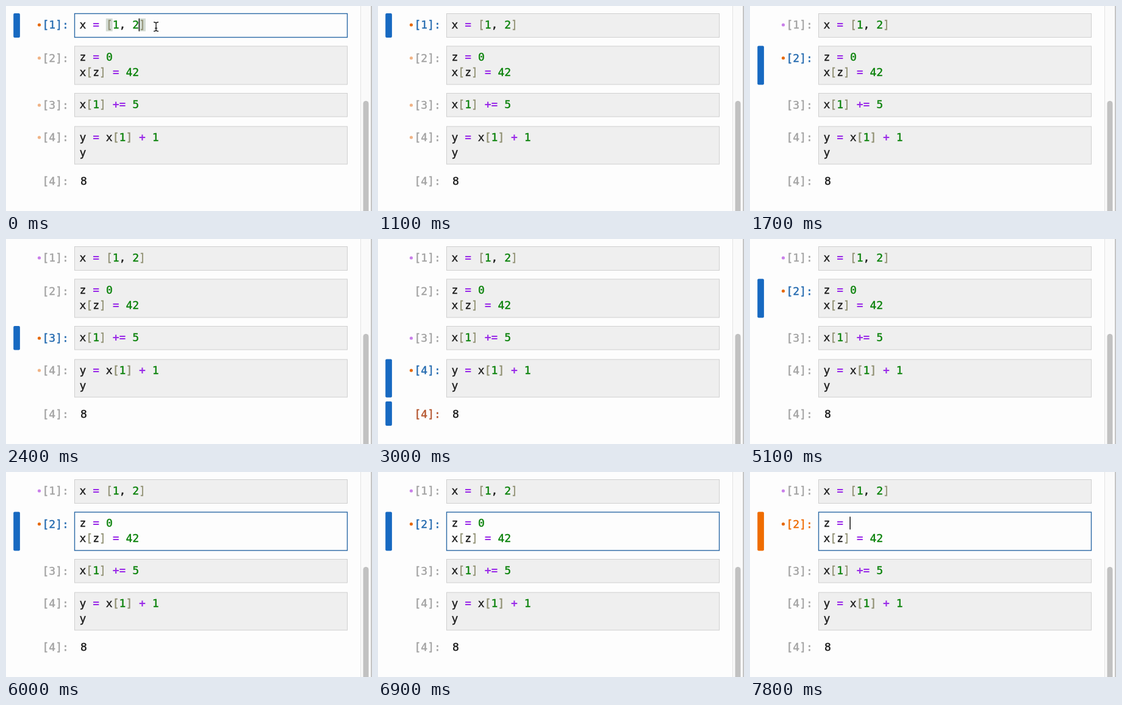
An HTML page for the animation above (8000 ms loop, 600 by 337 pixels).

```html
<!DOCTYPE html>
<html lang="en">
<head>
<meta charset="utf-8">
<title>Notebook cells</title>
<style>
  html, body { margin: 0; width: 100%; height: 100%; overflow: hidden; background: #fdfdfd; }
  svg { display: block; }
  text {
    font: 18px "DejaVu Sans Mono", "Liberation Mono", monospace; white-space: pre;
    color: #1c1c1c; fill: currentColor; stroke: currentColor; stroke-width: 0.4px;
  }
  tspan { fill: currentColor; stroke: currentColor; }
  .op { color: #9a2be8; font-weight: bold; stroke-width: 0; }
  .num { color: #0a820a; }
  .br { color: #8f8f72; }
</style>
</head>
<body>
<svg id="stage" width="600" height="337" viewBox="0 0 600 337"></svg>
<script>
const LOOP = 8000;
const CODE_X = 120.5;
const ADVANCE = 10.837;
const BLUE = '#1769c1';
const ORANGE = '#ef6c00';
const GRAY = '#a2a2a2';
const DOTS = { O: '#e66a08', o: '#f0b487', p: '#c980ea' };

// Dots of the four cells for each selected cell: O own, o downstream, p upstream
const LINKS = ['Oooo', 'pO--', 'p-Oo', 'p-pO'];

const CELLS = [
  { y: 12, h: 40, prompt: 37, dot: 31, lines: [['x = [1, 2]', 37]] },
  { y: 65.5, h: 64, prompt: 91.5, dot: 85.5, lines: [['z = 0', 90], ['x[z] = 42', 115]] },
  { y: 143, h: 39.5, prompt: 169, dot: 163, lines: [['x[1] += 5', 167.5]] },
  { y: 197.5, h: 63, prompt: 222, dot: 216, lines: [['y = x[1] + 1', 221.5], ['y', 246.5]] }
];

// Each step changes only the named parts of the state
const STEPS = [
  [0, { sel: 0, edit: true, caret: 9, match: true, mouse: true, dirty: false }],
  [500, { edit: false, caret: -1, match: false, mouse: false }],
  [1500, { sel: 1 }],
  [2400, { sel: 2 }],
  [3000, { sel: 3 }],
  [3600, { sel: 2 }],
  [4500, { sel: 1 }],
  [6000, { edit: true }],
  [6300, { caret: 5 }],
  [6900, { caret: -1 }],
  [7400, { caret: 5 }],
  [7700, { caret: 4, dirty: true }]
];

const stage = document.getElementById('stage');

function add(tag, attrs, parent = stage) {
  const el = document.createElementNS('http://www.w3.org/2000/svg', tag);
  for (const key in attrs) el.setAttribute(key, attrs[key]);
  parent.appendChild(el);
  return el;
}

function label(x, y, str) {
  const el = add('text', { x, y });
  el.textContent = str;
  return el;
}

function code(y, str) {
  const el = add('text', { x: CODE_X, y });
  for (const part of str.match(/[=+]+|\d+|[\[\]]|[^=+\d\[\]]+/g)) {
    const kind = /[=+]/.test(part) ? 'op' : /\d/.test(part) ? 'num' : /[\[\]]/.test(part) ? 'br' : '';
    add('tspan', { class: kind }, el).textContent = part;
  }
  return el;
}

function bar(y, height) {
  return add('rect', { x: 12.2, y, width: 10.7, height, rx: 2, fill: BLUE });
}

const show = (el, on) => { el.style.display = on ? '' : 'none'; };
const column = n => CODE_X + n * ADVANCE;

add('rect', { width: 600, height: 337, fill: '#fdfdfd' });

// Scroll bar
add('rect', { x: 581, width: 17, height: 337, fill: '#fafafa' });
add('rect', { x: 581, width: 1, height: 337, fill: '#e3e3e3' });
add('rect', { x: 585.5, y: 156, width: 9, height: 200, rx: 4.5, fill: '#c1c1c1' });
add('rect', { x: 598, width: 2, height: 337, fill: '#c4c4c4' });

const boxes = CELLS.map(c => add('rect', { x: 112.5, y: c.y + 0.5, width: 447, height: c.h - 1 }));
const bars = CELLS.map(c => bar(c.y, c.h));
const outBar = bar(267, 40);

const match = add('g', { fill: '#d2dad2' });
for (const n of [4, 9]) add('rect', { x: column(n), y: 20.5, width: ADVANCE, height: 21 }, match);

const dots = CELLS.map(c => add('circle', { cx: 54.5, cy: c.dot, r: 2.6 }));
const prompts = CELLS.map((c, i) => label(59.5, c.prompt, `[${i + 1}]:`));
const lines = CELLS.map(c => c.lines.map(([str, y]) => code(y, str)));
const zero = lines[1][0].lastChild;

const outPrompt = label(59.5, 293.5, '[4]:');
label(122, 293.5, '8');

const caret = add('rect', { width: 1.5, height: 21, fill: '#111' });
const mouse = add('path', {
  d: 'M242 26.5q4 0 4 2.5q0-2.5 4-2.5M246 29V39M242 41.5q4 0 4-2.5q0 2.5 4 2.5M244 36.5h4',
  fill: 'none', stroke: '#222', 'stroke-width': 1.4
});

function stateAt(time) {
  return Object.assign({}, ...STEPS.filter(([start]) => start <= time).map(([, change]) => change));
}

function draw(now) {
  const s = stateAt(now % LOOP);
  const accent = s.dirty ? ORANGE : BLUE;
  const promptColor = s.dirty ? ORANGE : '#256bb0';
  CELLS.forEach((c, i) => {
    const active = i === s.sel;
    const editing = active && s.edit;
    const dot = LINKS[s.sel][i];
    boxes[i].setAttribute('fill', editing ? '#fdfdfd' : '#efefef');
    boxes[i].setAttribute('stroke', editing ? '#2b69a6' : '#cfcfcf');
    boxes[i].setAttribute('stroke-width', editing ? 1.4 : 1);
    show(bars[i], active);
    bars[i].setAttribute('fill', accent);
    prompts[i].style.color = active ? promptColor : GRAY;
    show(dots[i], dot !== '-');
    dots[i].setAttribute('fill', DOTS[dot] || 'none');
  });
  show(outBar, s.sel === 3);
  outPrompt.style.color = s.sel === 3 ? '#b5562f' : GRAY;
  show(match, s.match);
  show(mouse, s.mouse);
  show(zero, !s.dirty);
  show(caret, s.caret >= 0);
  caret.setAttribute('x', column(s.caret) - 0.5);
  caret.setAttribute('y', s.sel ? 73.5 : 20.5);
}

const began = performance.now();
function tick() {
  draw(performance.now() - began);
  requestAnimationFrame(tick);
}
tick();
</script>
</body>
</html>
```
